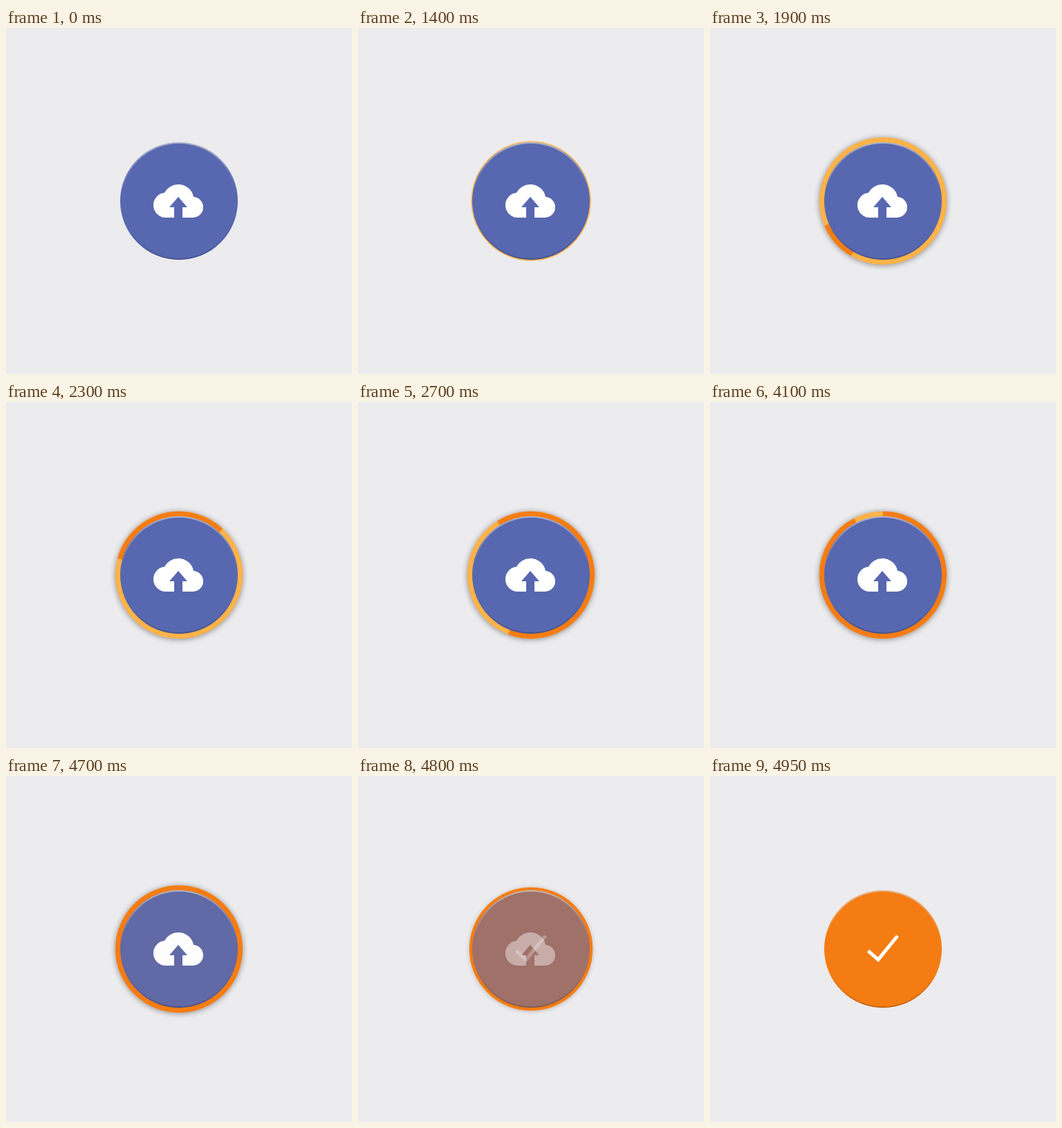
Write an HTML page without scripts that moves like this. It is 500 by 500 pixels and loops after 5000 ms.

```html
<!DOCTYPE html>
<html lang="en">
<head>
<meta charset="utf-8">
<title>Upload button</title>
<style>
  html, body { margin: 0; width: 100%; height: 100%; overflow: hidden; background: #ecebee; }
  svg { display: block; width: 100%; height: 100%; }

  .halo, .shadow, .arc, .face, .cloud, .check {
    transform-origin: 250px 250px;
    animation: 5s linear infinite;
  }
  .halo { animation-name: halo; }
  .shadow { animation-name: shadow; }
  .arc { animation-name: spin, fill; }
  .face { animation-name: face; }
  .cloud { animation-name: leave; }
  .check { animation-name: enter; }

  @keyframes halo {
    0%, 26.9% { transform: scale(.924); opacity: 0; }
    27% { transform: scale(.924); opacity: 1; }
    28% { transform: scale(.94); animation-timing-function: ease-out; }
    35%, 94% { transform: none; opacity: 1; animation-timing-function: ease-in-out; }
    98.6% { transform: scale(.92); opacity: 1; }
    98.9%, 100% { transform: scale(.92); opacity: 0; }
  }
  @keyframes shadow {
    0%, 28% { opacity: 0; }
    36%, 94% { opacity: .42; }
    98%, 100% { opacity: 0; }
  }
  /* tail of the arc, slowing down towards the top */
  @keyframes spin {
    0%, 34% { transform: rotate(66deg); }
    38% { transform: rotate(120deg); }
    42% { transform: rotate(163deg); }
    46% { transform: rotate(195deg); }
    50% { transform: rotate(220deg); }
    54% { transform: rotate(238deg); }
    60% { transform: rotate(258deg); }
    66% { transform: rotate(264deg); }
    71% { transform: rotate(268deg); }
    83%, 100% { transform: rotate(270deg); }
  }
  /* progress in degrees, with two stalls */
  @keyframes fill {
    0%, 34% { stroke-dasharray: 0 400; }
    38% { stroke-dasharray: 36.5 400; }
    42% { stroke-dasharray: 72 400; }
    46% { stroke-dasharray: 118 400; }
    50% { stroke-dasharray: 172 400; }
    54% { stroke-dasharray: 233 400; }
    60% { stroke-dasharray: 216 400; }
    66% { stroke-dasharray: 276 400; }
    71% { stroke-dasharray: 334 400; }
    83% { stroke-dasharray: 333 400; }
    92%, 100% { stroke-dasharray: 361 400; }
  }
  @keyframes face {
    0%, 93.7% { fill: #5768b0; }
    98.8%, 100% { fill: #f57c13; }
  }
  @keyframes leave {
    0%, 94% { opacity: 1; }
    97.5%, 100% { opacity: 0; }
  }
  @keyframes enter {
    0%, 95% { opacity: 0; }
    98.8%, 100% { opacity: 1; }
  }
</style>
</head>
<body>
<svg viewBox="0 0 500 500">
  <defs>
    <filter id="blur" x="-20%" y="-20%" width="140%" height="140%">
      <feGaussianBlur stdDeviation="4"/>
    </filter>
    <linearGradient id="rim" x1="0" y1="0" x2="0" y2="1">
      <stop offset="0" stop-color="#d8dad8" stop-opacity=".65"/>
      <stop offset=".4" stop-color="#d8dad8" stop-opacity="0"/>
      <stop offset=".7" stop-color="#000" stop-opacity="0"/>
      <stop offset="1" stop-color="#000" stop-opacity=".2"/>
    </linearGradient>
  </defs>

  <g class="halo">
    <circle class="shadow" cx="250" cy="251" r="92" filter="url(#blur)"/>
    <circle cx="250" cy="250" r="92" fill="#ffb347"/>
    <circle class="arc" cx="250" cy="250" r="88" pathLength="360" fill="none" stroke="#f57c13" stroke-width="8"/>
  </g>

  <circle class="face" cx="250" cy="250" r="85"/>
  <circle cx="250" cy="250" r="84" fill="none" stroke="url(#rim)" stroke-width="2"/>

  <g class="cloud">
    <path transform="translate(213 214) scale(3)" fill="#fff" d="M19.35 10.04A7.49 7.49 0 0 0 12 4 7.48 7.48 0 0 0 5.35 8.04 5.994 5.994 0 0 0 0 14a6 6 0 0 0 6 6h13a5 5 0 0 0 5-5c0-2.64-2.05-4.78-4.65-4.96zM14 15v5h-4v-5H7.700l4.300-5 4.300 5z"/>
  </g>
  <polyline class="check" points="228.500,252.700 243,265.300 271,231" fill="none" stroke="#fff" stroke-width="5"/>
</svg>
</body>
</html>
```
